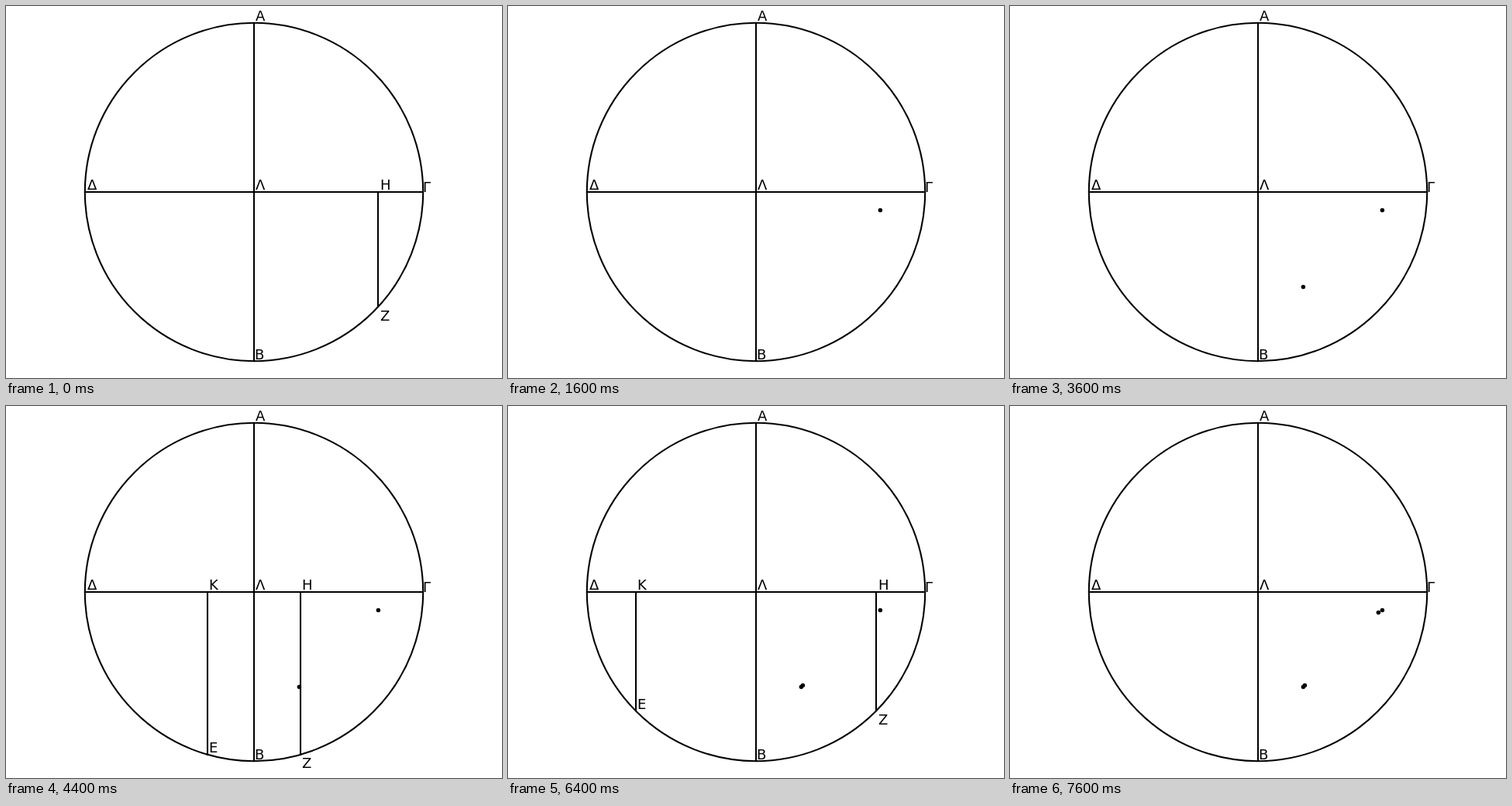
An HTML page that plays this animation: 640 px wide and 480 px high, repeating every 8 s.

```html
<!DOCTYPE html>
<html lang="el">
<head>
<meta charset="utf-8">
<style>
  html, body { margin: 0; width: 100%; height: 100%; overflow: hidden; background: #fff; }
  svg { display: block; width: 640px; height: 480px; }
  line, circle.ring { stroke: #000; stroke-width: 2.08; stroke-linecap: square; fill: none; }
  text { font: 18px "DejaVu Sans", sans-serif; }
</style>
</head>
<body>
<svg id="stage" viewBox="0 0 640 480"></svg>
<script>
const CX = 320, CY = 240, R = 480 / 2.2;
const STEP = 400, STEPS = 5;
const OFFSETS = [160, 57.8, 59.6, 155.3];  // half distance between K and H
const LOOP = STEP * STEPS * OFFSETS.length;
const stage = document.getElementById("stage");
const snap = Math.round;

function add(parent, tag, attrs, content) {
  const el = document.createElementNS("http://www.w3.org/2000/svg", tag);
  for (const key in attrs) el.setAttribute(key, attrs[key]);
  if (content) el.textContent = content;
  parent.appendChild(el);
  return el;
}
const group = () => add(stage, "g", {});
const line = (g, x1, y1, x2, y2) => add(g, "line", { x1, y1, x2, y2 });
const label = (g, s, x, y) => add(g, "text", { x: snap(x), y: snap(y) }, s);

const base = group();
add(base, "circle", { class: "ring", cx: CX, cy: CY, r: R });
line(base, CX, snap(CY - R), CX, snap(CY + R));
line(base, snap(CX - R), CY, snap(CX + R), CY);
label(base, "Α", 322, 19);
label(base, "Β", 321, 456);
label(base, "Γ", 538, 240);
label(base, "Δ", 105, 237);
label(base, "Λ", 322, 237);

// One round: right chord, left chord, crossing line, marked point
const rounds = OFFSETS.map(d => {
  const h = Math.sqrt(R * R - d * d);
  const left = CX - d, right = CX + d, low = CY + h;
  const cross = CY + h * (R - d) / (R + d);
  const parts = [group(), group(), group(), group()];
  const dot = group();

  line(parts[0], snap(right), CY, snap(right), snap(low));
  label(parts[0], "Η", right + 2.8, 237);
  label(parts[0], "Ζ", right + 2.8, low + 17.55);

  line(parts[1], snap(left), CY, snap(left), snap(low));
  label(parts[1], "Κ", left + 2.05, 237);
  label(parts[1], "Ε", left + 2.05, low - 2.5);

  line(parts[2], left, low, CX + R, CY);

  label(parts[3], "Θ", right + 2, cross + 17.5);
  add(dot, "circle", { cx: snap(right) + 0.4, cy: snap(cross) + 0.4, r: 2.75 });
  return { parts, dot };
});

const show = (el, on) => el.setAttribute("visibility", on ? "visible" : "hidden");

function draw(t) {
  const tick = Math.floor((t % LOOP) / STEP);
  rounds.forEach(({ parts, dot }, i) => {
    const step = tick - i * STEPS;
    parts.forEach((part, k) => show(part, step >= k && step < STEPS - 1));
    show(dot, step >= 3);
  });
}

const start = performance.now();
function frame() {
  draw(performance.now() - start);
  requestAnimationFrame(frame);
}
frame();
</script>
</body>
</html>
```
